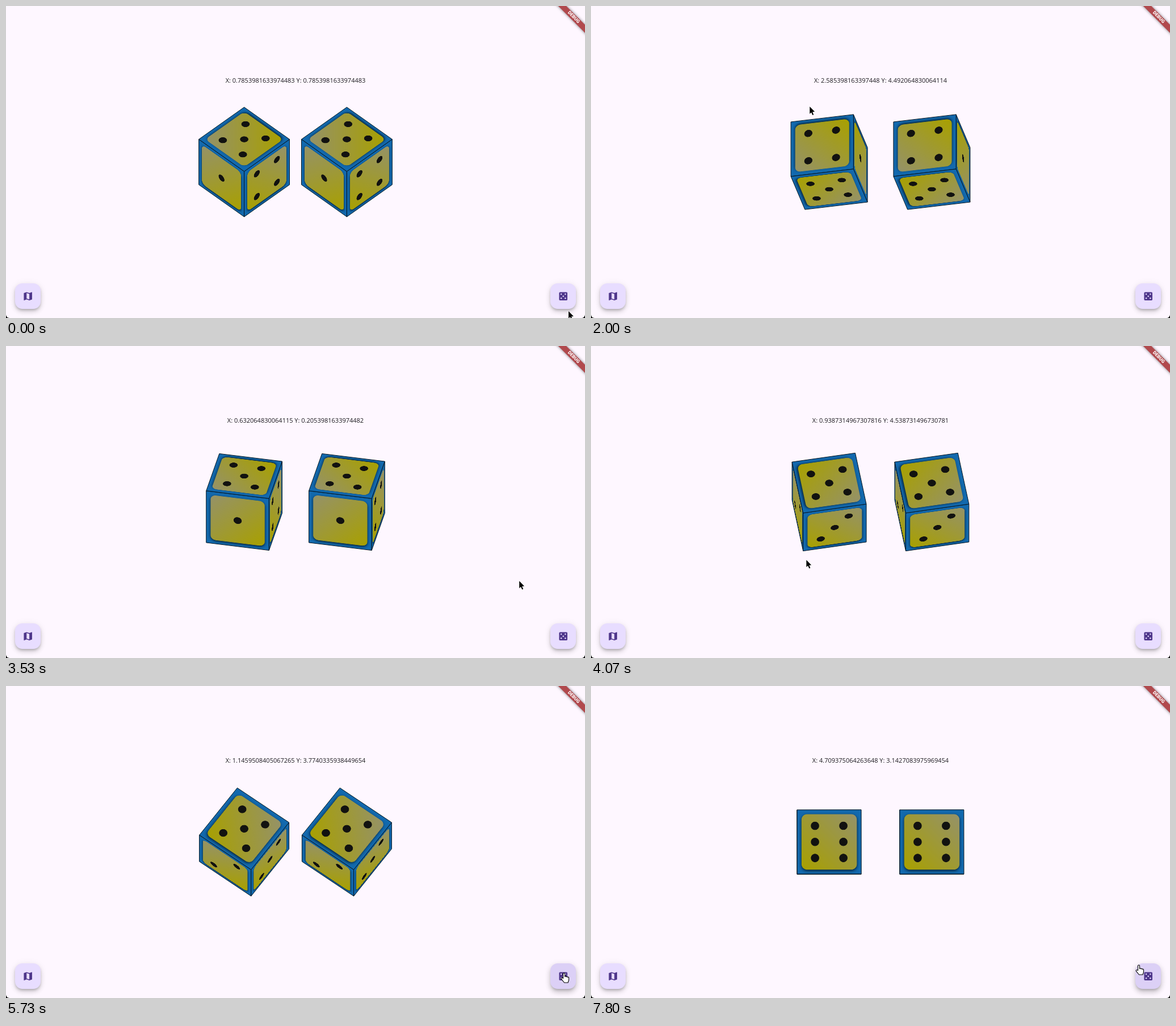
An HTML page with a canvas that plays this animation: 1020 px wide and 549 px high, repeating every 8870 ms.

```html
<!DOCTYPE html>
<html lang="en">
<head>
<meta charset="utf-8">
<title>Rolling dice</title>
<style>
  html, body { margin: 0; width: 100%; height: 100%; overflow: hidden; background: #000; }
  #stage { position: relative; width: 1020px; height: 549px; overflow: hidden;
    background: #fef7ff; border-radius: 0 0 6px 6px; }
  #stage > * { position: absolute; }
  canvas { left: 0; top: 0; }
  #angles { left: 0; top: 123px; width: 100%; text-align: center; white-space: pre;
    font: 11px/16px "Open Sans", "Noto Sans", sans-serif; color: #1d1b20; }
  .fab { top: 488px; width: 45px; height: 45px; border-radius: 13px; background: #e8ddff;
    box-shadow: 0 3px 4px -1px #0003, 0 5px 8px #0002, 0 1px 14px #0001; }
  .fab svg { position: absolute; left: 12.8px; top: 12.5px; width: 19.4px; height: 19.4px; fill: #4f378b; }
  .fab.hover { background: #dcd0f6;
    box-shadow: 0 4px 4px -2px #0003, 0 6px 8px 1px #0002, 0 2px 11px 2px #0001; }
  #banner { left: 955px; top: 14.6px; width: 90px; height: 9.7px; transform: rotate(45deg);
    background: #b1494d; box-shadow: 0 0 5px #0008; color: #fff; text-align: center;
    font: 900 8.2px/9.7px Roboto, "Open Sans", sans-serif; }
  #pointer { left: 0; top: 0; width: 20px; height: 24px; overflow: visible; }
</style>
</head>
<body>
<div id="stage">
  <div id="angles"></div>
  <canvas id="dice" width="1020" height="549"></canvas>
  <div class="fab" style="left:16px">
    <svg viewBox="0 0 24 24"><path d="M20.5 3l-.16.03L15 5.1 9 3 3.36 4.9c-.21.07-.36.25-.36.48V20.5c0 .28.22.5.5.5l.16-.03L9 18.9l6 2.1 5.64-1.9c.21-.07.36-.25.36-.48V3.5c0-.28-.22-.5-.5-.5zM15 19l-6-2.11V5l6 2.11V19z"/></svg>
  </div>
  <div class="fab" id="roll" style="left:959px">
    <svg viewBox="0 0 24 24">
      <rect x="3" y="3" width="18" height="18" rx="2"/>
      <g fill="#e8ddff">
        <circle cx="7.5" cy="7.5" r="1.5"/><circle cx="16.5" cy="7.5" r="1.5"/>
        <circle cx="12" cy="12" r="1.5"/>
        <circle cx="7.5" cy="16.5" r="1.5"/><circle cx="16.5" cy="16.5" r="1.5"/>
      </g>
    </svg>
  </div>
  <div id="banner">DEBUG</div>
  <svg id="pointer">
    <path id="arrow" d="M0 0V12.6L2.8 10.1 5 15 7 14.1 4.9 9.4 8.8 9Z" stroke="#fff" paint-order="stroke"/>
    <path id="hand" transform="translate(-5.5 -.5)" fill="#fff" stroke="#000" stroke-width="1.1" stroke-linejoin="round"
      d="M4 10V2a1.5 1.5 0 0 1 3 0v5a1.4 1.4 0 0 1 2.6.4 1.4 1.4 0 0 1 2.4.6 1.2 1.2 0 0 1 2 1v4l-1.5 4.5H6L1 11.3a1.3 1.3 0 0 1 2-1.8z"/>
  </svg>
</div>
<script>
const LOOP = 8870, TURN = 2 * Math.PI, QUARTER = Math.PI / 2, HALF = 56.5;
const { sin, cos } = Math;
const $ = id => document.getElementById(id);
const ctx = $('dice').getContext('2d');

// A face starts at the front of the cube and is swung into place.
const makeFace = (pips, yaw, pitch) => ({
  art: paintFace(pips),
  right: [cos(yaw), 0, -sin(yaw)],
  down: [0, cos(pitch), sin(pitch)],
  out: [sin(yaw) * cos(pitch), -sin(pitch), -cos(yaw) * cos(pitch)]
});
const faces = [
  makeFace(1, 0, 0), makeFace(2, Math.PI, 0),
  makeFace(3, -QUARTER, 0), makeFace(4, QUARTER, 0),
  makeFace(5, 0, QUARTER), makeFace(6, 0, -QUARTER)
];

function paintFace(pips) {
  const art = document.createElement('canvas');
  art.width = art.height = HALF * 4;
  const g = art.getContext('2d');
  g.scale(2, 2);
  g.translate(HALF, HALF);
  g.fillStyle = '#1269ae';
  g.fillRect(-HALF, -HALF, 2 * HALF, 2 * HALF);

  const shade = g.createLinearGradient(-48, -48, 48, 48);
  shade.addColorStop(0, '#959268');
  shade.addColorStop(1, '#a8a000');
  g.fillStyle = shade;
  g.shadowColor = '#000b';
  g.shadowBlur = 11;
  g.shadowOffsetY = 4;
  g.beginPath();
  g.roundRect(-48.7, -48.7, 97.4, 97.4, 9.5);
  g.fill();

  g.shadowColor = 'transparent';
  g.fillStyle = '#121210';
  const spots = pips % 2 ? [[0, 0]] : [];
  if (pips > 2) spots.push([-1, -1], [1, 1]);
  if (pips === 2 || pips > 3) spots.push([1, -1], [-1, 1]);
  if (pips === 6) spots.push([-1, 0], [1, 0]);
  for (const [u, v] of spots) {
    g.beginPath();
    g.arc(u * 25, v * 28.3, 7.3, 0, TURN);
    g.fill();
  }
  return art;
}

function drawDie(left, top, ax, ay) {
  const project = ([x, y, z]) => {
    const depth = cos(ay) * z - sin(ay) * x;
    return [
      cos(ay) * x + sin(ay) * z,
      cos(ax) * y - sin(ax) * depth,
      sin(ax) * y + cos(ax) * depth
    ];
  };
  for (const face of faces) {
    const out = project(face.out);
    if (out[2] >= 0) continue;
    const r = project(face.right), d = project(face.down);
    ctx.setTransform(r[0], r[1], d[0], d[1], left + out[0] * HALF, top + out[1] * HALF);
    ctx.drawImage(face.art, -HALF, -HALF, 2 * HALF, 2 * HALF);
    ctx.beginPath();
    ctx.rect(-HALF, -HALF, 2 * HALF, 2 * HALF);
    ctx.resetTransform();
    ctx.stroke();
  }
}

// Turning points of the pointer: tick, x, y.
const path = [
  [0, 991, 537], [12, 834, 395], [30, 385.3, 177.1], [36, 256, 270],
  [44, 489.4, 613.7], [53, 904.2, 413.6], [65, 195.7, 370.8], [70, 456, 459],
  [72, 916, 493], [74, 983, 505], [113, 983, 505], [117, 965, 491]
];

// Cubic through the points that never overshoots them.
function track(tick, axis) {
  const slope = i => path[i] && path[i + 1]
    ? (path[i + 1][axis] - path[i][axis]) / (path[i + 1][0] - path[i][0]) : 0;
  const tangent = i => {
    const a = slope(i - 1), b = slope(i);
    return a * b > 0 ? 2 * a * b / (a + b) : 0;
  };
  let i = 0;
  while (i < path.length - 2 && path[i + 1][0] <= tick) i++;
  const span = path[i + 1][0] - path[i][0], s = (tick - path[i][0]) / span, q = 1 - s;
  return path[i][axis] * (1 + 2 * s) * q * q + path[i + 1][axis] * (3 - 2 * s) * s * s
    + span * s * q * (tangent(i) * q - tangent(i + 1) * s);
}

const DRAG_START = 12, DRAG_END = 65, ROLL_START = 75, ROLL_END = 105;
const wrap = a => (a % TURN + TURN) % TURN;

// Dragging turns the dice by 1/150 rad for each 0.807 px.
const dragged = (from, to) => wrap(Math.PI / 4 + Math.round((from - to) / 0.807) / 150);
function dragAngles(tick) {
  const t = Math.min(Math.max(tick, DRAG_START), DRAG_END);
  return [dragged(395, track(t, 2)), dragged(834, track(t, 1))];
}

const rest = [4.709375064263648, 3.1427083975969454];
const spins = [4, 3], powers = [2.4236, 2.3362];
function rollAngles(tick) {
  const left = (ROLL_END + 0.7 - tick) / (ROLL_END + 0.7 - ROLL_START);
  return dragAngles(DRAG_END).map((from, i) =>
    wrap(rest[i] - (rest[i] + spins[i] * TURN - from) * left ** powers[i]));
}

function draw(tick) {
  const [ax, ay] = tick >= ROLL_END ? rest
    : tick > ROLL_START ? rollAngles(tick) : dragAngles(tick);
  $('angles').textContent = `X: ${ax} Y: ${ay}`;

  ctx.clearRect(0, 0, 1020, 549);
  ctx.lineJoin = 'round';
  ctx.strokeStyle = '#06141f';
  drawDie(419.6, 274.5, ax, ay);
  drawDie(600.4, 274.5, ax, ay);

  const hover = tick >= 73;
  $('pointer').style.transform = `translate(${track(tick, 1)}px, ${track(tick, 2)}px)`;
  $('arrow').style.display = hover ? 'none' : '';
  $('hand').style.display = hover ? '' : 'none';
  $('roll').classList.toggle('hover', hover);
}

const start = performance.now();
let shown = -1;
function play() {
  const t = (performance.now() - start) % LOOP;
  const tick = Math.min(117, Math.floor((t + 4) * 0.015));
  if (tick !== shown) draw(shown = tick);
  requestAnimationFrame(play);
}
play();
</script>
</body>
</html>
```
